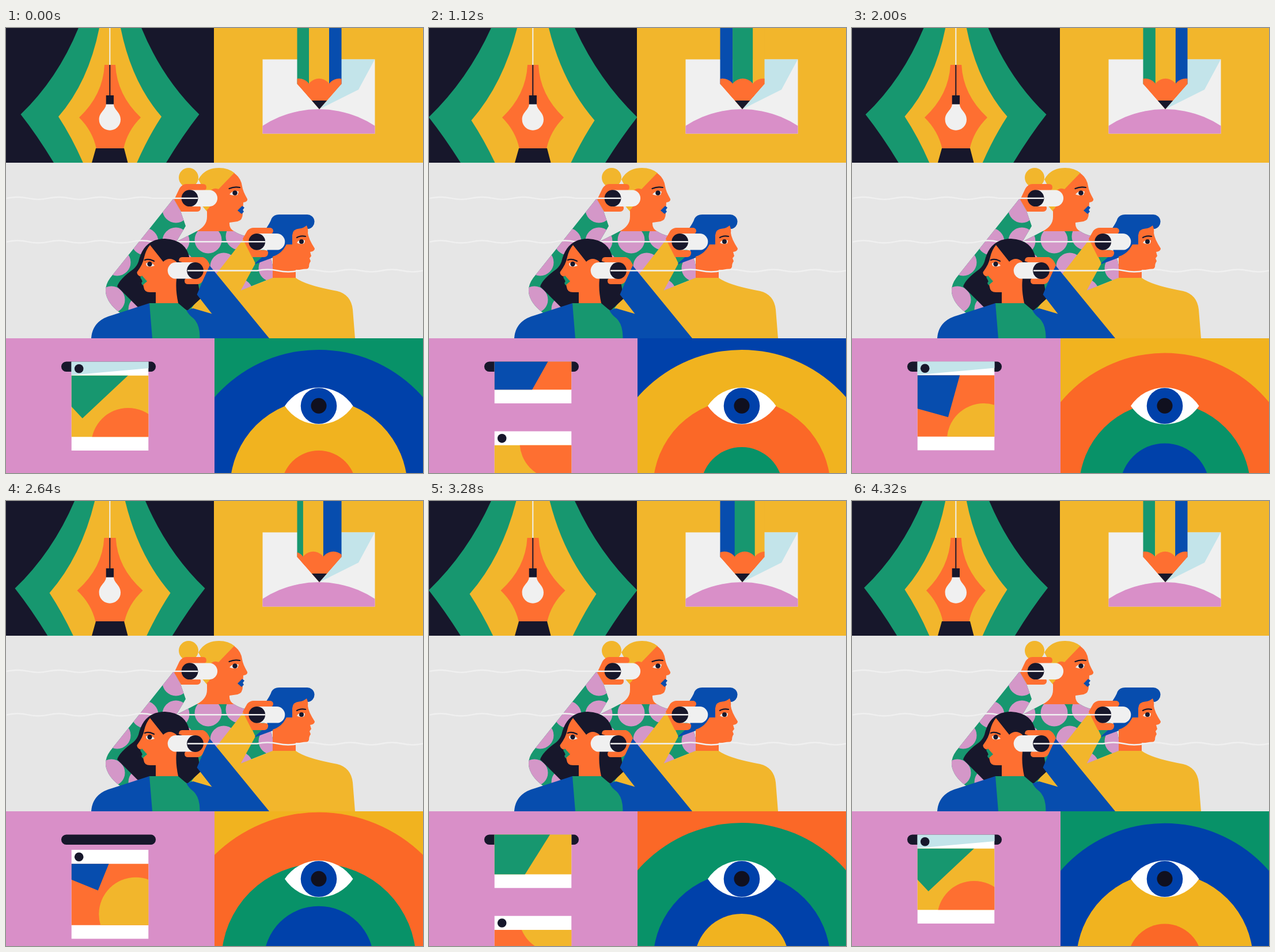
These frames come from a looping animation (724 by 773 pixels, 4.4 s). An HTML page:

```html
<!DOCTYPE html>
<html lang="en">
<head>
<meta charset="utf-8">
<title>Five panels</title>
<style>
  html, body { margin: 0; width: 100%; height: 100%; overflow: hidden; }
  #stage { display: block; width: 100vw; height: 100vh; }
  .g { fill: #17976f } .y { fill: #f2b62c } .o { fill: #fe6f31 } .b { fill: #074dae }
  .p { fill: #d98fc8 } .k { fill: #17172b } .w { fill: #f0f0f0 } .s { fill: #c3e4ea }
  #dots { fill: #d497c8 }
  .line { fill: none; stroke: #f0f0f0; stroke-width: 2.4; stroke-linecap: round }
  .brow { fill: none; stroke: #17172b; stroke-width: 2.2; stroke-linecap: round }
</style>
</head>
<body>
<svg id="stage" viewBox="0 0 724 773" preserveAspectRatio="none">
  <defs>
    <clipPath id="lampClip"><path d="M0 0H361V234H0z"/></clipPath>
    <clipPath id="pencilClip"><path d="M505.5 0H582.5V97L544 141 505.5 97z"/></clipPath>
    <clipPath id="sheetClip"><path d="M445.5 54.5H640.5V183.5H445.5z"/></clipPath>
    <clipPath id="eyeClip"><path d="M362 539H724V773H362z"/></clipPath>
    <clipPath id="shirtClip"><use href="#shirt"/></clipPath>
  </defs>

  <!-- lamp -->
  <g clip-path="url(#lampClip)">
    <path class="k" d="M0 0H361V234H0z"/>
    <path class="g" id="beamG"/><path class="y" id="beamY"/><path class="o" id="beamO"/>
    <path class="k" d="M156 209H205L211.5 234H149z"/>
    <path d="M180.3 0V65" stroke="#f0f0f0" stroke-width="2"/>
    <path d="M180.3 64V118" stroke="#17172b" stroke-width="2"/>
    <path class="k" d="M173.7 117H187V133H173.7z"/>
    <path class="w" d="M173.7 132.5H187C187 142 199 146 199 159A18.7 18.7 0 0 1 161.6 159C161.6 146 173.7 142 173.7 132.5z"/>
  </g>

  <!-- pencil -->
  <path class="y" d="M361 0H724V234H361z"/>
  <g clip-path="url(#sheetClip)">
    <path class="w" d="M445 54H641V184H445z"/>
    <path class="s" d="M582 54H640.5L612 107 544 141z"/>
    <circle class="p" cx="543" cy="319.4" r="178.4"/>
  </g>
  <g clip-path="url(#pencilClip)">
    <g id="stripes"></g>
    <path class="o" d="M505 97H583L544 142z"/>
    <path class="k" d="M520 126H570V142H520z"/>
  </g>

  <!-- listeners -->
  <path fill="#e6e6e6" d="M0 234H724V539H0z"/>
  <g id="blonde">
    <path id="shirt" class="g" d="M291 296L181 434Q170 449 174 464Q179 482 201 497L330 500 405 457 463 434Q466 408 455 390L418 362Q405 359 396 353H331Q318 360 296 371L312 344 303 318z"/>
    <g id="dots" clip-path="url(#shirtClip)"></g>
    <circle class="y" cx="317" cy="260" r="17"/>
    <path class="y" d="M334 263Q345 243 370 243Q386 243 397 252L362 316 350 320 338 306 345 284z"/>
    <path class="o" d="M396 252Q408 260 410 275Q411 283 419 297Q420 302 412 303L411 322Q411 334 402 336L388 338Q387 348 396 353H331Q349 344 349 328V316Q360 308 354 286Q358 276 369 280z"/>
    <path class="b" d="M402 317L410 309 414 312 411 316 413 319 409 323z"/>
    <path class="brow" d="M387.5 279Q396 275 406 277"/>
    <path class="w" d="M388 289Q394 281 404 284L402 290Q394 292 388 289z"/>
    <circle class="k" cx="397.5" cy="286.5" r="4.3"/>
    <path class="o" d="M292 298L301 279Q306 271 313 271H342Q348 271 348 277Q348 282 342 282H330L325 308H333Q339 309 338 314Q337 319 331 319H304z"/>
    <path class="w" d="M319 281.5H354A14.3 14.3 0 0 1 354 310H319z"/>
    <circle class="k" cx="319" cy="295.7" r="14.4"/>
  </g>
  <g id="man">
    <path class="y" d="M463 434H503Q520 447 575 457Q599 463 602 489L606 539H400L357 480 405 457z"/>
    <path class="y" d="M413 366L362 431 322 487 357 497 407 457 433 409z"/>
    <path class="b" d="M449 352Q459 338 461 331Q465 324 474 324H522A12.4 12.4 0 0 1 524 349L497 379 483 386 480 398 455 397z"/>
    <path class="b" d="M432 409L456 388H484L463 399 433 410z"/>
    <path class="o" d="M497 376V360Q498 349 509 348.500Q516 348 522 343Q525 349 524 356Q525 366 536 383Q536 388 528 389L530 396 527 400 529 405Q526 409 526 415Q524 420 518 420H503V434H463V397Q474 394 482 384L487 376z"/>
    <path class="brow" d="M505 364Q512 360 520 362"/>
    <path class="w" d="M505 373Q510 366 519 369L518 374Q511 377 505 373z"/>
    <circle class="k" cx="513" cy="371" r="4"/>
    <path class="o" d="M411 366L419 352Q424 347 430 347H459Q464 348 464 353Q463 358 458 358H446L443 386H451Q456 387 455 392Q454 398 447 398H427z"/>
    <path class="w" d="M436 357H470A14.3 14.3 0 0 1 470 385.6H436z"/>
    <circle class="k" cx="435.7" cy="371.3" r="14.4"/>
  </g>
  <g id="backStrings"></g>
  <g id="brunette">
    <path class="k" d="M230 406Q239 366 276 366Q314 368 319 402L334 446 338 470 315 491 295 478 231 487 193 449Q197 436 221 419Q227 414 230 406z"/>
    <path class="b" d="M148 539Q150 508 184 499L249 478 260 539z"/>
    <path class="b" d="M353 412L331.5 463 357.5 496.5 325 487 312 491 330 539H457z"/>
    <path class="g" d="M249 478H299L313 490Q317 498 325 504Q337 515 336.5 539H254z"/>
    <path class="o" d="M250 377L273 406Q284 396 296 406V436Q294 455 299 478H260V459H250Q240 459 239 450L235 432Q227 430 227.5 424Q238 410 240 398Q243 385 250 377z"/>
    <path class="g" d="M233 433L236 430 245 440 237 447 235 443 237 440z"/>
    <path class="brow" d="M241 403Q248 400 257 405"/>
    <path class="w" d="M243 409Q250 404 258 413Q249 416 244 413z"/>
    <circle class="k" cx="249.5" cy="410" r="4.2"/>
    <path class="o" d="M300 405Q300 398 306 398H342Q349 400 354 412L341 440Q338 445 332 445H316Q310 445 310 439Q310 435 315 434L322 407H306z"/>
    <path class="w" d="M328 407H295A14.3 14.3 0 0 0 295 435.6H328z"/>
    <circle class="k" cx="328.5" cy="421.5" r="14.4"/>
  </g>
  <g id="frontString"></g>

  <!-- poster -->
  <path fill="#d98fc8" d="M0 539H362V773H0z"/>
  <rect class="k" x="96" y="579.5" width="164" height="17.5" rx="8.7"/>
  <svg x="113.5" y="579.5" width="134" height="193.5" viewBox="113.5 579.5 134 193.5" id="posters"></svg>

  <!-- eye -->
  <g clip-path="url(#eyeClip)">
    <g id="rings"></g>
    <path fill="#fff" d="M484 656.5A71 71 0 0 1 602.5 656.5A71 71 0 0 1 484 656.5z"/>
    <circle fill="#0041aa" cx="543" cy="656.5" r="31.3"/>
    <circle fill="#10101f" cx="543" cy="656.3" r="13.5"/>
  </g>
</svg>
<script>
const LOOP = 4400, HALF = LOOP / 2, STEP = LOOP / 4, TICK = 80;
const $ = id => document.getElementById(id);

function add(parent, tag, attrs = {}) {
  const el = document.createElementNS('http://www.w3.org/2000/svg', tag);
  set(el, attrs);
  return parent.appendChild(el);
}
function set(el, attrs) {
  for (const k in attrs) el.setAttribute(k, attrs[k]);
}
const mix = (a, b, p) => a + (b - a) * p;

// cubic-bezier(x1, 0, x2, 1)
const bezier = (x1, x2) => x => {
  if (x <= 0) return 0;
  if (x >= 1) return 1;
  let lo = 0, hi = 1;
  for (let i = 0; i < 24; i++) {
    const s = (lo + hi) / 2, r = 1 - s;
    if (3 * r * r * s * x1 + 3 * r * s * s * x2 + s * s * s < x) lo = s; else hi = s;
  }
  return 3 * lo * lo - 2 * lo * lo * lo;
};

// Smooth cyclic curve through a few values
const KEYS = [0, 640, 1120, 2000, 2640, 3280, 4320];
function track(vals, t) {
  const n = KEYS.length;
  const time = i => KEYS[(i + n) % n] + LOOP * Math.floor(i / n);
  const val = i => vals[(i + n) % n];
  const slope = i => (val(i + 1) - val(i - 1)) / (time(i + 1) - time(i - 1));
  let i = n - 1;
  while (KEYS[i] > t) i--;
  const d = time(i + 1) - time(i), s = (t - time(i)) / d, r = 1 - s;
  return val(i) * r * r * (1 + 2 * s) + val(i + 1) * s * s * (3 - 2 * s)
    + d * s * r * (slope(i) * r - slope(i + 1) * s);
}

// Lamp: mirrored shapes from half-widths [x, y], with concave sides
function beam(id, top, c1, tip, c2, end) {
  const R = ([x, y]) => `${x} ${y}`, L = ([x, y]) => `${-x} ${y}`;
  $(id).setAttribute('d', `M${R(top)}Q${R(c1)} ${R(tip)}Q${R(c2)} ${R(end)}L${L(end)}Q${L(c2)} ${L(tip)}Q${L(c1)} ${L(top)}z`);
}
function scaleBeam(id, sx, sy) {
  set($(id), { transform: `translate(180.5 121) scale(${sx} ${sy}) translate(0 -121)` });
}
beam('beamG', [47, -20], [84, 82], [155, 150], [122, 192], [88, 250]);
beam('beamY', [15, -20], [32, 88], [89.5, 154], [62, 196], [40, 250]);
beam('beamO', [9.5, 64], [12, 116], [53.5, 155.5], [30, 179], [23.5, 210]);
function lamp(t) {
  const g = track([155, 163, 181, 157, 165, 181, 159.5], t) / 155;
  const y = track([89.5, 109, 107, 89, 105, 110, 89], t) / 89.5;
  const o = track([53.5, 57, 53.5, 54.5, 57, 56, 51.5], t) / 53.5;
  scaleBeam('beamG', g, g);
  scaleBeam('beamY', y, y);
  scaleBeam('beamO', o, 1);
}

// Pencil
for (let i = 0; i < 6; i++) {
  const x = 491 + 35 * i;
  add($('stripes'), 'rect', { class: 'gyb'[i % 3], x, y: 0, width: 35.3, height: 99 });
}
for (let i = 0; i < 6; i++)
  add($('stripes'), 'circle', { class: 'o', cx: 508.5 + 35 * i, cy: 109.3, r: 21.5 });
const turn = bezier(.42, .39);
function pencil(t) {
  set($('stripes'), { transform: `translate(${-105 * turn(t % HALF / HALF)} 0)` });
}

// Dots and strings
for (const [cx, cy] of [[295, 315], [241, 371], [295, 370], [351, 368], [405, 362], [193, 407],
  [183, 472], [303, 412], [378, 414], [462, 417], [405, 459], [236, 488]])
  add($('dots'), 'circle', { cx, cy, r: 23.5 });

function string(layer, from, to, y, hand) {
  let d = `M${hand} ${y}H${from}`;
  const dir = Math.sign(to - from);
  for (let x = from, up = -1; (to - x) * dir > 0; x += 36 * dir, up = -up)
    d += `q${18 * dir} ${up * 4} ${36 * dir} 0`;
  add($(layer), 'path', { class: 'line', d });
}
string('backStrings', 254, 2, 295.7, 332);
string('backStrings', 254, 2, 371.3, 449);
string('frontString', 436, 724, 421.5, 316);

// Poster: windows sliding over a slowly swinging picture
const posters = ['yog', 'oyb', 'yog'].map(([back, disc, card]) => {
  const box = add($('posters'), 'g');
  add(box, 'rect', { x: 113.5, y: 579.5, width: 134, height: 154.5, fill: '#fff' });
  const shade = add(box, 'path', { class: 's', d: 'M113 579.5H248V591L113 603z' });
  add(box, 'circle', { class: 'k', cx: 126.7, cy: 591.8, r: 7.8 });
  const view = add(box, 'svg', { x: 113.5, y: 603.7, width: 134, height: 106.5 });
  add(view, 'rect', { class: back, x: 0, y: 0, width: 400, height: 1200 });
  return {
    box, shade, view,
    disc: add(view, 'circle', { class: disc, r: 64 }),
    card: add(view, 'path', { class: card, d: 'M0 0H250V-250H0z' })
  };
});
const feed = bezier(.53, .44);
function poster(t) {
  const slide = 203 * (feed(t / 2100) + feed((t - 2054) / 2100));
  const sweep = 2 * Math.min(1, t % HALF / 2020) - 1;
  const swing = t < HALF ? sweep : -sweep;
  posters.forEach((p, i) => {
    const off = slide - 203 * i;
    set(p.box, { transform: `translate(0 ${off})` });
    set(p.shade, { visibility: off > -20 && off < 6 ? 'visible' : 'hidden' });
    set(p.view, { viewBox: `113.5 ${603.7 + off} 134 106.5` });
    set(p.disc, { cx: 220.5 + 8.5 * swing, cy: 720 - 4 * swing });
    set(p.card, { transform: `translate(${150 + 17.3 * swing} ${677 - swing}) rotate(${-59 - 15.8 * swing})` });
  });
}

// Eye: each ring grows into the place of the one outside it
const RINGS = [['#089268', 71], ['#0041aa', 83], ['#f1b31f', 82], ['#fb6827', 65]];
const rings = [0, 1, 2, 3, 4].map(() => add($('rings'), 'circle', { cx: 543, cy: 799 }));
const grow = bezier(.7, .52);
function eye(t) {
  const n = Math.floor(t / STEP), p = grow(t % STEP / STEP);
  rings.forEach((ring, i) => {
    const [fill, rest] = RINGS[(n + i) % 4];
    const size = [400, 345, 240, 154, rest];
    const from = [400, 240, 154, rest, 0];
    set(ring, { fill, r: mix(from[i], size[i], p) });
  });
}

const start = performance.now();
function frame() {
  const now = performance.now() - start;
  const t = Math.floor((now + 16) / TICK) * TICK % LOOP;
  lamp(t);
  pencil(t);
  poster(t);
  eye(t);
  requestAnimationFrame(frame);
}
frame();
</script>
</body>
</html>
```
